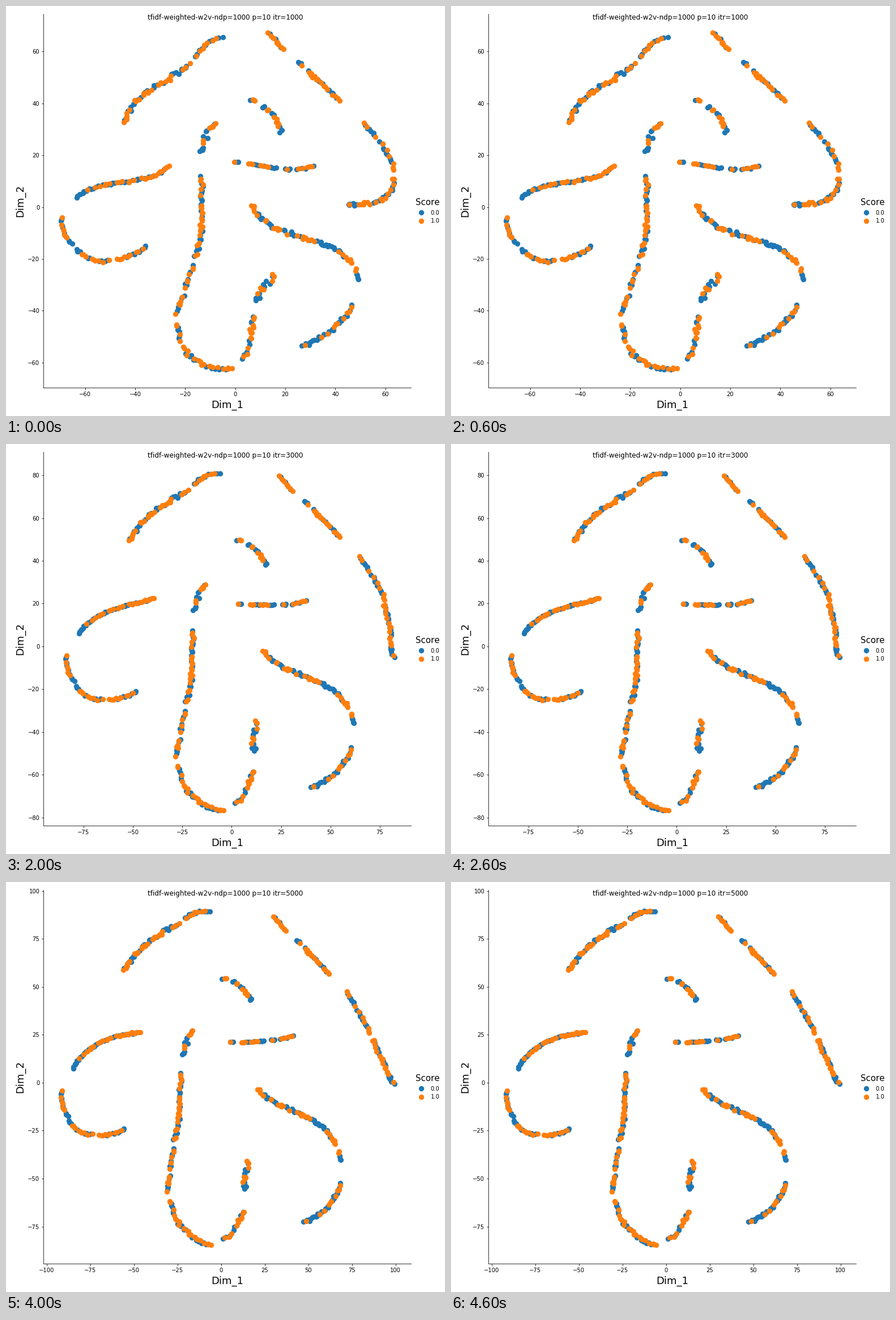
These frames come from a looping animation (775 by 723 pixels, 5000 ms). A matplotlib script:

```python
import numpy as np
import matplotlib.pyplot as plt
from matplotlib.animation import FuncAnimation

W, H, DPI = 775, 723, 72
LEFT, RIGHT, TOP, BOTTOM = 66.3, 715.3, 13.7, 673.3
BLUE, ORANGE = "#1f77b4", "#ff7f0e"
STEPS = 5
DOT = dict(s=62, linewidths=1.5)

# Per step: pixel position of the data origin and pixels per unit, x then y
VIEWS = [
    (404.7, 4.417, 354.5, 4.567),
    (405.4, 3.800, 356.6, 4.036),
    (398.4, 3.487, 356.9, 3.772),
    (387.3, 3.243, 355.3, 3.577),
    (379.8, 3.080, 353.8, 3.383),
]

plt.rcParams.update({"font.family": "DejaVu Sans", "text.kerning_factor": 6})
rng = np.random.default_rng(7)
strands = []


def ease(t):
    return 1 - (1 - t) ** 1.5


def along(knots, u):
    """Points at u on the polynomial through the knots, and its length."""
    p = np.reshape(knots, (-1, 2))
    d = np.r_[0, np.cumsum(np.hypot(*np.diff(p, axis=0).T))]
    coef = np.polyfit(d / d[-1], p, len(p) - 1)
    return np.vander(u, len(p)) @ coef, d[-1]


def strand(start, end, via=None, spread=.25):
    """A string of beads easing from one curve to another."""
    length = along(start, [0])[1]
    u = np.linspace(0, 1, max(4, round(length / .75)))
    a, b = along(start, u)[0], along(end, u)[0]
    bow = 0 if via is None else along(via, u)[0] - (a + (b - a) * ease(.5))
    shake = rng.normal(0, spread, a.shape).clip(-2 * spread, 2 * spread)
    blue = rng.random(len(u)) < .52
    strands.append((a + shake, b + shake, bow, blue))


def beads(step):
    t = step / (STEPS - 1)
    pos = [a + (b - a) * ease(t) + bow * 4 * t * (1 - t) for a, b, bow, _ in strands]
    return np.vstack(pos)


# Upper left arc
strand((-16, 58.1, -11.9, 62.5, -5.4, 66), (-20.7, 85.7, -14.9, 88.6, -6.8, 89.5), spread=.45)
strand((-44.5, 32.5, -40.5, 40, -31.6, 46.7, -18.7, 55.5),
       (-56.1, 58.5, -50.3, 65.6, -41.8, 73, -24.6, 83), spread=.5)

# Upper right arc
strand((13, 67.3, 19.3, 61), (29.9, 86.3, 37.1, 79.2))
strand((25.4, 55.9, 26.8, 54.4), (43.6, 74.1, 45.5, 72.4))
strand((29, 52.7, 41.7, 41.1), (47.8, 70.3, 61.8, 56.7))
strand((51.5, 32.3, 56, 27.3), (72.1, 47.2, 76.7, 40.1))
strand((57.8, 24.9, 61, 20.3, 63.2, 15), (78, 37.5, 81.6, 32.2, 84.8, 26.5), spread=.35)
strand((62.8, 11.3, 61.9, 5.8, 55.5, 2.1, 44.7, 1.2),
       (86.8, 22.4, 90.6, 15, 94.5, 7, 98.8, -.4),
       via=(76.7, 19.6, 79, 13.8, 80.2, 5, 81.9, -4.8), spread=.4)

# Short arc and bar in the middle
strand((6.2, 41.7, 7.8, 41.1), (.7, 54.6, 3, 54.3))
strand((11.4, 38.9, 15, 36, 18, 28.8), (7.2, 52.9, 12.4, 49, 16.9, 43.1), spread=.4)
strand((-.2, 17.4, 1.4, 17.4), (5.3, 21.2, 6.9, 21.2))
strand((5.3, 16.8, 16.4, 15), (11.8, 20.9, 24.4, 21.8), spread=.1)
strand((20, 14.6, 22, 14.6), (28.6, 22.1, 30.9, 22.4), spread=.15)
strand((24.7, 14.6, 31.3, 15.7), (33.8, 22.7, 41.3, 24.5), spread=.15)

# Left loop
strand((-63.6, 3.8, -55.4, 7.8, -40.9, 10.2, -26.4, 15.9),
       (-85, 7.6, -74.6, 18, -60, 24.2, -46.4, 26.2), spread=.2)
strand((-69.2, -3.6, -68.3, -10.4, -65.1, -13.9), (-91.2, -3.9, -90.8, -12.2, -87.6, -17.2))
strand((-63.1, -16.1, -56.5, -20.5, -50.4, -20.7), (-86.9, -19.6, -81.1, -25.5, -73.6, -27))
strand((-47, -20, -41.8, -18.7, -35.7, -15), (-69.7, -27.3, -63.2, -27, -55.5, -24))

# Long U, down the left arm and up the right
strand((-7.6, 32.5, -11.9, 27.7, -13.7, 21.3), (-16.2, 27.4, -19.1, 23.3, -22, 14.4), spread=.5)
strand((-13.7, 11.5, -13.3, 2.1, -13.7, -10, -16, -19.4),
       (-23, 4.7, -23.6, -6.9, -24.6, -20.8, -26.9, -30.2), spread=.35)
strand((-16.9, -22.4, -20.1, -31.2), (-27.2, -34.3, -29.5, -45), spread=.35)
strand((-21, -34, -23.3, -40.8), (-29.8, -48.2, -30.5, -56.5), spread=.35)
strand((-23.5, -45.2, -21.9, -51.6), (-29.5, -61.5, -26.6, -69.2), spread=.3)
strand((-20.5, -54.2, -16, -59.2, -9.7, -61.9, -1.7, -62.1),
       (-25.9, -71.3, -19.7, -77.8, -13.9, -81.9, -6.1, -84.3), spread=.4)
strand((2.8, -58.4, 5, -54.8), (1, -81.3, 5.9, -79), spread=.4)
strand((5.7, -52.4, 6.4, -47.2, 7.5, -41.9), (7.2, -76, 10.5, -71.6, 13.1, -66.9), spread=.4)
strand((8.4, -35.8, 10.7, -31.2, 15.5, -26.4), (13.4, -55, 13.4, -49.7, 15.3, -41.1),
       via=(11.4, -48.5, 10.8, -43, 12.5, -35), spread=.6)

# Lower right S
strand((6.4, .5, 14.8, -7.3, 30.6, -12.8, 46.5, -21.8),
       (20.8, -3.6, 33.2, -11.3, 50.1, -18.4, 65.3, -32.3), spread=.35)
strand((48.1, -23.8, 49.4, -27.9), (67.3, -35.8, 68.6, -40.3))
strand((26.8, -53.3, 35.8, -49.2, 46.9, -38.4), (47.5, -72.2, 59.2, -66.3, 68.6, -53), spread=.4)

is_blue = np.concatenate([s[3] for s in strands])

fig = plt.figure(figsize=(W / DPI, H / DPI), dpi=DPI, facecolor="white")
ax = fig.add_axes([LEFT / W, 1 - BOTTOM / H, (RIGHT - LEFT) / W, (BOTTOM - TOP) / H])
ax.spines[["top", "right"]].set_visible(False)
ax.set_xlabel("Dim_1", size=18)
ax.set_ylabel("Dim_2", size=18)
clouds = [(ax.scatter([], [], color=c, **DOT), mask)
          for c, mask in ((BLUE, is_blue), (ORANGE, ~is_blue))]
title = fig.suptitle("", size=12)

# Legend, measured in stage pixels
stage = fig.add_axes([0, 0, 1, 1])
stage.set(xlim=(0, W), ylim=(H, 0))
stage.axis("off")
stage.text(722.5, 351, "Score", size=15)
for y, color, label in ((364, BLUE, "0.0"), (379, ORANGE, "1.0")):
    stage.scatter(732.5, y, color=color, **DOT)
    stage.text(749.5, y + 3.5, label, size=10)


def draw(step):
    x0, kx, y0, ky = VIEWS[step]
    ax.set_xlim((LEFT - x0) / kx, (RIGHT - x0) / kx)
    ax.set_ylim((y0 - BOTTOM) / ky, (y0 - TOP) / ky)
    title.set_text(f"tfidf-weighted-w2v-ndp=1000 p=10 itr={1000 * (step + 1)}")
    points = beads(step)
    for cloud, mask in clouds:
        cloud.set_offsets(points[mask])
    return [title] + [cloud for cloud, _ in clouds]


anim = FuncAnimation(fig, draw, frames=STEPS, interval=1000, repeat=True, repeat_delay=0)
plt.show()
```
